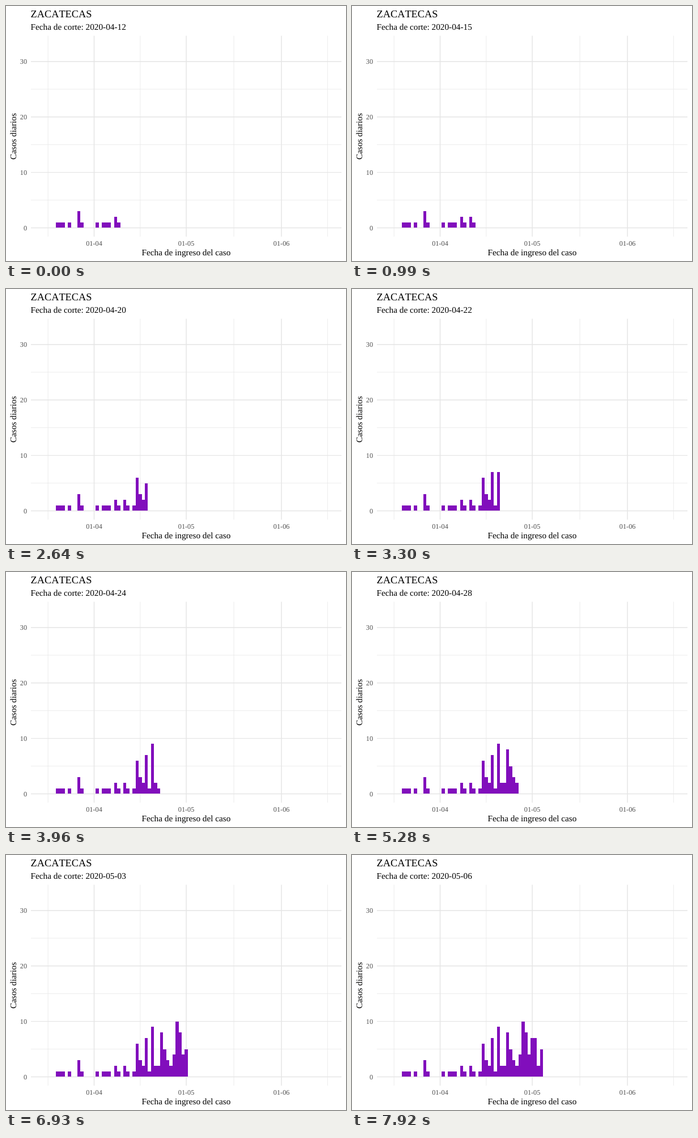
An HTML page that plays this animation: 600 by 450 pixels, repeating every 8000 ms.

```html
<!DOCTYPE html>
<html lang="es">
<head>
<meta charset="utf-8">
<title>Casos diarios</title>
<style>
  html, body { margin: 0; width: 100%; height: 100%; overflow: hidden; background: #fff; }
  svg { display: block; width: 600px; height: 450px; }
  text {
    font: 15.28px "Liberation Serif", "Times New Roman", serif;
    font-kerning: none;
    text-rendering: geometricPrecision;
  }
  .title { font-size: 18.33px; }
  .tick { font-size: 12.22px; fill: #4d4d4d; }
  .mid { text-anchor: middle; }
  .end { text-anchor: end; }
  .major { stroke: #e5e5e5; stroke-width: 1.45; }
  .minor { stroke: #e8e8e8; stroke-width: .8; }
  #bars { fill: #810ebc; shape-rendering: crispEdges; }
</style>
</head>
<body>
<svg viewBox="0 0 600 450">
  <g id="grid"></g>
  <path id="bars"/>
  <text class="title" x="43.5" y="20">ZACATECAS</text>
  <text id="cutoff" x="43.5" y="42"></text>
  <text class="mid" x="318" y="440">Fecha de ingreso del caso</text>
  <text class="mid" transform="translate(18 230) rotate(-90)">Casos diarios</text>
</svg>
<script>
const LOOP = 8000, STEP = 330;
const FIRST_CUTOFF = 11;
const PANEL = { left: 44, right: 592, top: 52.5, bottom: 407 };
const grid = document.getElementById('grid');
const bars = document.getElementById('bars');
const cutoffLabel = document.getElementById('cutoff');

// Days count from 1 April.
const dayX = day => 155.5 + 5.42 * day;
const countY = count => 391.45 - 9.785 * count;
const isoDate = day => new Date(Date.UTC(2020, 3, 1 + day)).toISOString().slice(0, 10);

// A wave opens on a day with some cases, then scales by a daily ratio until the next one.
const wave = (day, cases, ratio = .35) => ({ day, cases, ratio });
const waves = [
  wave(-12, 1, .75), wave(-8, 1), wave(-5, 3), wave(1, 1), wave(3, 1, .75),
  wave(7, 2), wave(10, 2), wave(13, 1), wave(14, 6, .55), wave(17, 7, .2),
  wave(19, 9), wave(20, 2, .9), wave(22, 8, .65), wave(26, 4, 2.5),
  wave(28, 8, .5), wave(30, 7, 1), wave(32, 2, 3.2)
];

function totalCases(day) {
  const { day: start, cases, ratio } = waves.findLast(w => w.day <= day);
  return cases * ratio ** (day - start);
}

// Cases reach the report after two days (one on every eighth day) and fill up over two more.
function reportedCases(day, cutoff) {
  const age = cutoff - day - (day % 8 ? 2 : 1);
  return age < 0 ? 0 : Math.round(totalCases(day) * Math.min(1, .75 + .17 * age));
}

function barPath(cutoff) {
  const base = Math.round(countY(0));
  let path = '';
  for (let day = waves[0].day; day < cutoff; day++) {
    const count = reportedCases(day, cutoff);
    if (!count) continue;
    const left = Math.round(dayX(day - .5)), right = Math.round(dayX(day + .5));
    path += `M${left} ${base}V${Math.round(countY(count))}H${right}V${base}Z`;
  }
  return path;
}

function add(tag, attrs, text = '') {
  const el = document.createElementNS(grid.namespaceURI, tag);
  for (const name in attrs) el.setAttribute(name, attrs[name]);
  el.textContent = text;
  grid.append(el);
}
const vLine = (x, kind) => add('line', { class: kind, x1: x, x2: x, y1: PANEL.top, y2: PANEL.bottom });
const hLine = (y, kind) => add('line', { class: kind, x1: PANEL.left, x2: PANEL.right, y1: y, y2: y });

for (let n = 5; n < 30; n += 10) hLine(countY(n), 'minor');
[-15, 15, 45.5, 76].forEach(day => vLine(dayX(day), 'minor'));
for (let n = 0; n <= 30; n += 10) {
  hLine(countY(n), 'major');
  add('text', { class: 'tick end', x: 37, y: countY(n) + 4.3 }, n);
}
[0, 30, 61].forEach((day, i) => {
  vLine(dayX(day), 'major');
  add('text', { class: 'tick mid', x: dayX(day), y: 423 }, `01-0${4 + i}`);
});

let shown;
function draw() {
  const cutoff = FIRST_CUTOFF + Math.floor(performance.now() % LOOP / STEP);
  if (cutoff !== shown) {
    shown = cutoff;
    bars.setAttribute('d', barPath(cutoff));
    cutoffLabel.textContent = `Fecha de corte: ${isoDate(cutoff)}`;
  }
  requestAnimationFrame(draw);
}
draw();
</script>
</body>
</html>
```
